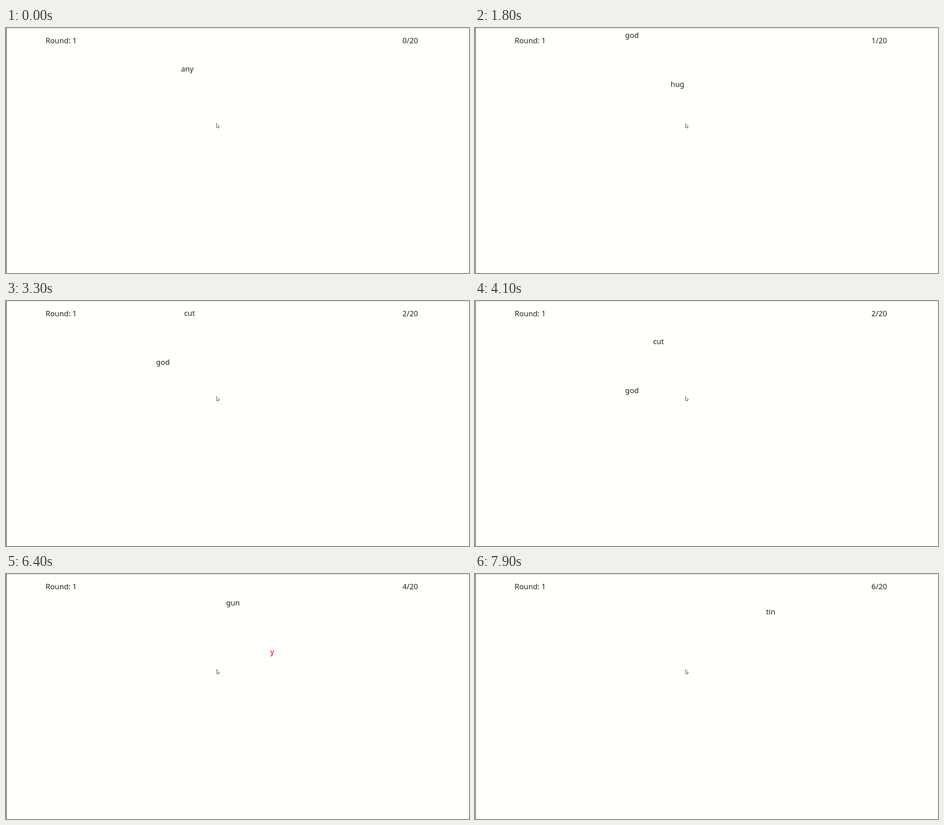
Animation of 1028x545 px, one loop 8000 ms. Source, as an HTML page:

```html
<!DOCTYPE html>
<html lang="en">
<head>
<meta charset="utf-8">
<title>Falling words</title>
<style>
  html, body { margin: 0; width: 100%; height: 100%; overflow: hidden; background: #fffffb; }
  svg { display: block; width: 100%; height: 100%; }
  text { font: 16.5px "Noto Sans", sans-serif; fill: #222; }
  .mid { text-anchor: middle; }
</style>
</head>
<body>
<svg id="stage" viewBox="0 0 1028 545">
  <rect width="1028" height="1" fill="#d2d3cf"/>
  <rect width="1" height="545" fill="#111"/>
  <text x="88" y="34" textLength="">Round: 1</text>
  <text id="score" class="mid" x="897.6" y="34"></text>
  <path d="M467.5 212.5V222L469.7 220L471.2 223L472.7 222.3L471.4 219.4H474Z"
        fill="#fff" stroke="#444" stroke-width=".9"/>
</svg>
<script>
const LOOP = 8000, STEP = 100, GAP = 109, FIRST_Y = 97;

// x: centre; typed: times at which a letter is struck off; gone: word removed; scored: counter rises
const words = [
  { text: "any", x: 402.5, typed: [1000, 1200], gone: 1300, scored: 1300 },
  { text: "hug", x: 449.5, typed: [2300, 2500], gone: 2700, scored: 2800 },
  { text: "god", x: 348.5, typed: [4200, 4400], gone: 4500, scored: 4500 },
  { text: "cut", x: 407.5, typed: [5200], gone: 5300, scored: 5300 },
  { text: "ivy", x: 591, typed: [6300, 6400], gone: 6500, scored: 6500 },
  { text: "gun", x: 504, typed: [7200, 7400], gone: 7500, scored: 7500 },
  { text: "tin", x: 656.5, typed: [], gone: Infinity, scored: Infinity }
];

// Distance fallen at a few moments; the fall stutters slightly
const fall = [
  [0, 0], [1000, 79], [1200, 98], [1800, 143], [2500, 194.5], [2600, 208.5],
  [3600, 286], [3800, 305], [3900, 305], [4100, 326], [4400, 353], [5200, 413],
  [6400, 517.5], [7400, 607], [7500, 617], [7900, 647]
];

const stage = document.getElementById("stage");
const score = document.getElementById("score");
for (const word of words) {
  word.el = document.createElementNS(stage.namespaceURI, "text");
  word.el.setAttribute("class", "mid");
  word.el.setAttribute("x", word.x);
  stage.append(word.el);
}

function fallen(t) {
  const i = Math.max(1, fall.findIndex(([time]) => time >= t));
  const [t0, y0] = fall[i - 1], [t1, y1] = fall[i];
  return y0 + (y1 - y0) * (t - t0) / (t1 - t0);
}

function draw(now) {
  const t = Math.floor(now % LOOP / STEP) * STEP;
  const y = FIRST_Y + fallen(t);
  words.forEach(({ el, text, typed, gone }, i) => {
    const struck = typed.filter(time => time <= t).length;
    const red = struck && Math.min(208, 176 + (t - typed[0]) * 0.16);
    el.textContent = t < gone ? text.slice(struck) : "";
    el.setAttribute("y", y - GAP * i);
    el.style.fill = struck ? `rgb(${red}, 0, 24)` : "";
  });
  score.textContent = words.filter(word => word.scored <= t).length + "/20";
  requestAnimationFrame(draw);
}
requestAnimationFrame(draw);
</script>
</body>
</html>
```
